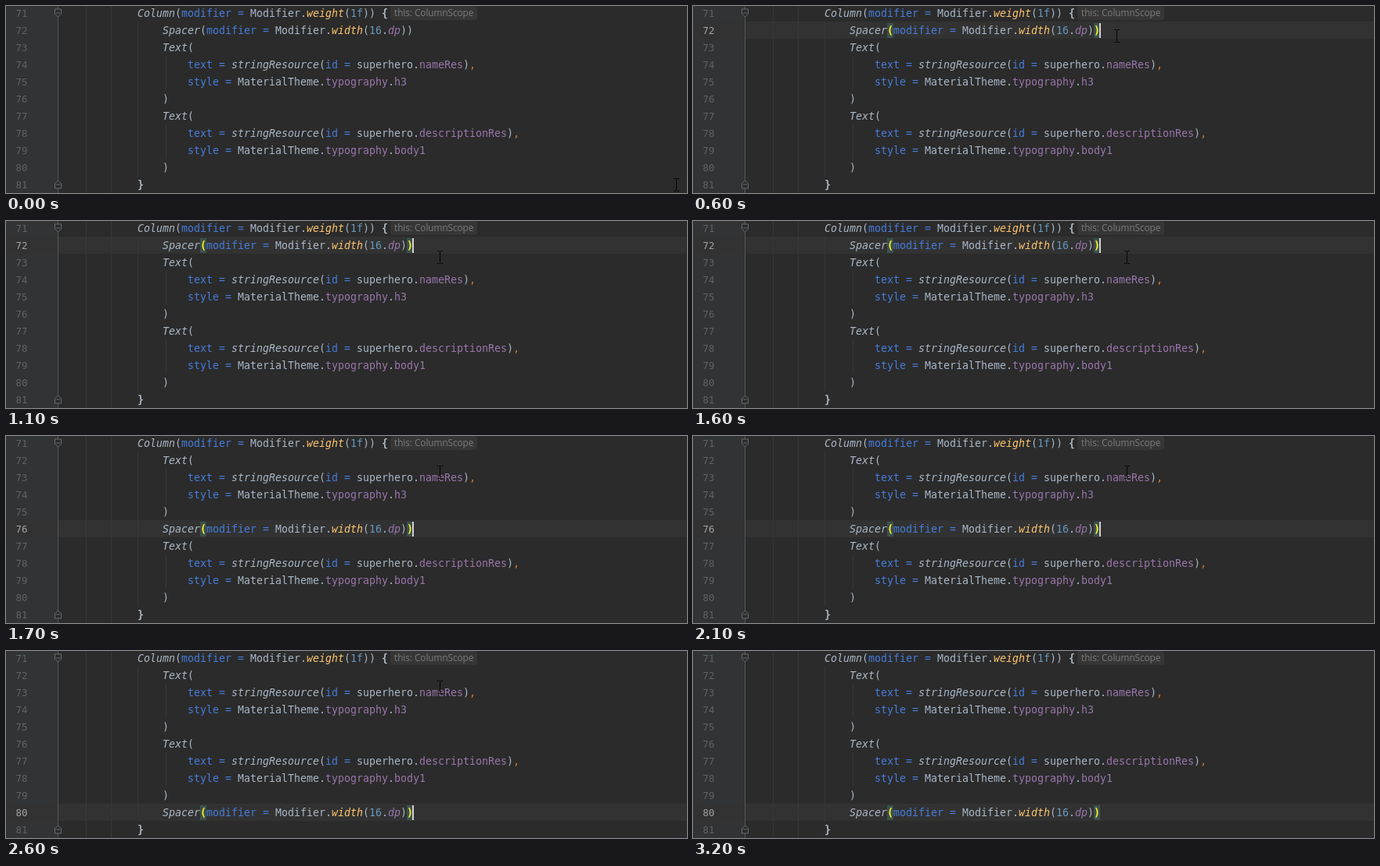
These frames come from a looping animation (870 px wide and 240 px high, 3600 ms). An HTML page with a canvas:

```html
<!DOCTYPE html>
<html lang="en">
<head>
<meta charset="utf-8">
<title>Moving a line of code</title>
<style>
  html, body { margin: 0; width: 100%; height: 100%; overflow: hidden; background: #2b2b2b; }
  canvas { display: block; }
</style>
</head>
<body>
<canvas id="stage" width="870" height="240"></canvas>
<script>
const ctx = document.getElementById('stage').getContext('2d');
const LOOP = 3600, ROW = 22, CHAR = 8, FIRST = 71;
const MONO = '"DejaVu Sans Mono", "Noto Sans Mono", monospace';
const PLAIN = '#a9b7c6', PURPLE = '#9876aa';

const spacer = 'Spacer(modifier = Modifier.width(16.dp))';
const textCall = (res, type) => [
  'Text(',
  `    text = stringResource(id = superhero.${res}),`,
  `    style = MaterialTheme.typography.${type}`,
  ')'
];
const title = textCall('nameRes', 'h3');
const body = textCall('descriptionRes', 'body1');

// Syntax rules, first match wins: [pattern, colour, font style]
const rules = [
  [/^\w+ =/, '#467cda', ''],
  [/^(Column|Spacer|Text|stringResource)\b/, PLAIN, 'italic'],
  [/^(weight|width)\b/, '#ffc66d', 'italic'],
  [/^dp\b/, PURPLE, 'italic'],
  [/^(nameRes|descriptionRes|typography|h3|body1)\b/, PURPLE, ''],
  [/^\d+f?/, '#6897bb', ''],
  [/^,/, '#cc7832', ''],
  [/^[{}]/, PLAIN, 'bold'],
  [/^(\w+|\s+|.)/, PLAIN, '']
];

function rect(x, y, w, h, color) {
  ctx.fillStyle = color;
  ctx.fillRect(x, y, w, h);
}

function label(text, x, y, color, font) {
  ctx.font = font;
  ctx.fillStyle = color;
  ctx.fillText(text, x, y);
}

const rowTop = row => row * ROW - 2;
const baseline = row => row * ROW + 14;
const codeFont = style => `${style} 13.29px ${MONO}`;

function codeLine(line, x, row) {
  while (line) {
    const [pattern, color, style] = rules.find(r => r[0].test(line));
    const token = line.match(pattern)[0];
    label(token, x, baseline(row), color, codeFont(style));
    x += token.length * CHAR;
    line = line.slice(token.length);
  }
}

function brace(char, x, row) {
  rect(x, rowTop(row) + 2, CHAR, 19, '#3b514d');
  label(char, x, baseline(row), '#ffef28', codeFont('bold'));
}

// Fold marker: a pentagon pointing down (dir 1) or up (dir -1)
function fold(y, dir) {
  ctx.beginPath();
  [[-4, -5], [4, -5], [4, 1], [0, 5], [-4, 1]].forEach(([dx, dy]) => ctx.lineTo(66.5 + dx, y + dy * dir));
  ctx.closePath();
  ctx.fillStyle = '#2b2b2b';
  ctx.fill();
  ctx.strokeStyle = '#6a6c6e';
  ctx.lineWidth = 1;
  ctx.stroke();
  rect(64, y - 0.5, 5, 1, '#6a6c6e');
}

function pointer([x, y]) {
  x = Math.round(x);
  y = Math.round(y);
  rect(x, y - 7, 1, 15, '#050505');
  for (const edge of [-8, 8]) {
    rect(x - 3, y + edge, 3, 1, '#050505');
    rect(x + 1, y + edge, 3, 1, '#050505');
  }
}

const mix = (a, b, k) => a.map((v, i) => v + (b[i] - v) * k);
const span = (t, from, to) => Math.min(1, Math.max(0, (t - from) / (to - from)));
const easeOut = k => 1 - (1 - k) ** 2;

function pointerAt(t) {
  const start = [856, 229], click = [541, 38], rest = [554, 46];
  if (t <= 600) return mix(start, click, easeOut(span(t, 0, 500)));
  if (t <= 2700) return mix(click, rest, easeOut(span(t, 600, 1100)));
  return mix(rest, [554, 252], span(t, 2700, 3200) ** 2);
}

function draw(now) {
  const t = Math.floor(now % LOOP / 100) * 100;
  const focused = t >= 500 || t < 0;
  const current = t >= 2300 ? 9 : t >= 1700 ? 5 : 1;
  const inner = current === 1 ? [spacer, ...title, ...body]
    : current === 5 ? [...title, spacer, ...body]
    : [...title, ...body, spacer];

  rect(0, 0, 870, 240, '#2b2b2b');
  rect(0, 0, 66, 240, '#313335');
  if (focused) rect(0, rowTop(current), 870, ROW, '#323232');

  for (const x of [102, 134]) rect(x, 0, 1, 240, '#373737');
  rect(168, rowTop(1), 1, ROW * 9, '#373737');
  rect(66, 0, 1, 240, '#555555');
  fold(9, 1);
  fold(229, -1);

  for (let row = 0; row < 11; row++) {
    const color = focused && row === current ? '#a4a3a3' : '#606366';
    label(FIRST + row, 12.5, baseline(row), color, `12.4px ${MONO}`);
  }

  codeLine('Column(modifier = Modifier.weight(1f)) {', 168, 0);
  inner.forEach((line, i) => {
    if (line[0] === ' ') rect(204, rowTop(i + 1), 1, ROW, '#373737');
    codeLine(line, 200, i + 1);
  });
  codeLine('}', 168, 10);

  ctx.beginPath();
  ctx.roundRect(491, 0, 111, 18, 4);
  ctx.fillStyle = '#363636';
  ctx.fill();
  label('this: ColumnScope', 496, 13, '#7c7c7c', '11.7px "Open Sans", sans-serif');

  if (focused) {
    brace('(', 248, current);
    brace(')', 512, current);
    if (t < 3200) rect(519, rowTop(current) + 2, 2, 19, '#d0d0d0');
  }
  pointer(pointerAt(t));
}

const began = performance.now();
function tick() {
  draw(performance.now() - began);
  requestAnimationFrame(tick);
}
tick();
</script>
</body>
</html>
```
